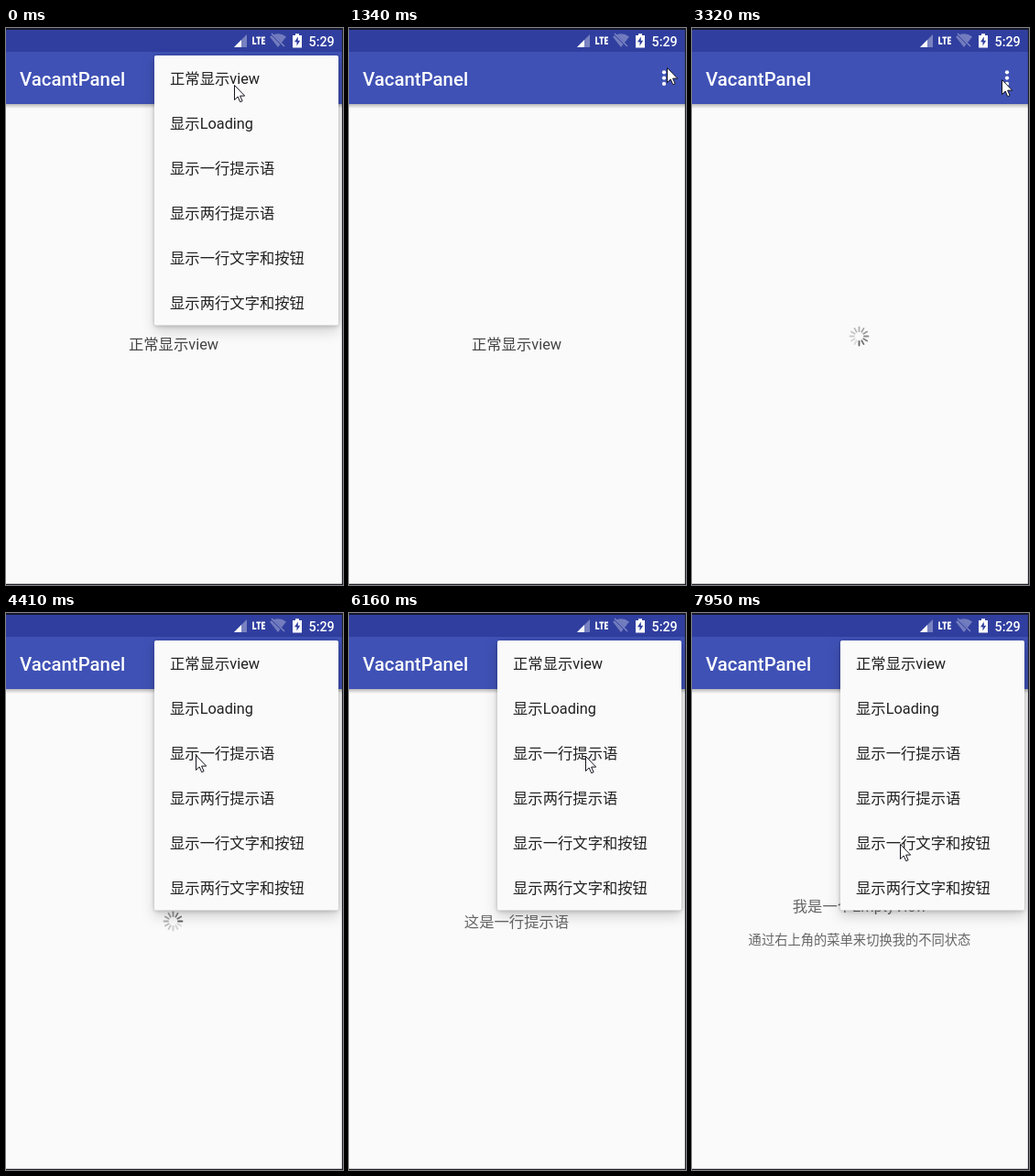
An HTML page for the animation above (8000 ms loop, 368x608 px).

```html
<!DOCTYPE html>
<html lang="zh-CN">
<head>
<meta charset="utf-8">
<title>View states</title>
<style>
  html, body { margin: 0; width: 100%; height: 100%; overflow: hidden; background: #fafafa; }
  svg { display: block; width: 368px; height: 608px; }
  text { font: 16.33px Roboto, "Noto Sans CJK SC", "Noto Sans CJK", sans-serif; }
  .medium { font-weight: 500; fill: #fff; }
  .state { text-anchor: middle; fill: #666; }
  #menu { filter: drop-shadow(0 1px 2px rgba(0,0,0,.22)) drop-shadow(0 6px 7px rgba(0,0,0,.17)); }
  #menu text { fill: #212121; }
</style>
</head>
<body>
<svg viewBox="0 0 368 608">
  <defs>
    <linearGradient id="barShadow" x2="0" y2="1">
      <stop stop-color="#000" stop-opacity=".26"/>
      <stop offset="1" stop-color="#000" stop-opacity="0"/>
    </linearGradient>
    <clipPath id="rowClip"><rect id="rowShape" x="162" width="201" height="49"/></clipPath>
    <clipPath id="reveal"><rect id="revealShape"/></clipPath>
  </defs>

  <rect width="368" height="608" fill="#fafafa"/>
  <g class="state"><text x="183" y="351" fill="#444">正常显示view</text></g>
  <g class="state" id="spinner" transform="translate(182.5 336.5)"></g>
  <g class="state"><text x="183" y="343">这是一行提示语</text></g>
  <g class="state">
    <text x="183" y="325.5">我是一个EmptyView</text>
    <text x="183" y="361.5" style="font-size:14.29px">通过右上角的菜单来切换我的不同状态</text>
  </g>

  <rect y="83" width="368" height="5" fill="url(#barShadow)"/>
  <rect y="26" width="368" height="57" fill="#3f51b5"/>
  <rect width="368" height="26" fill="#303f9f"/>
  <text class="medium" x="15" y="62.5" style="font-size:20.4px">VacantPanel</text>
  <g fill="#fff">
    <circle cx="344" cy="48.3" r="2.1"/>
    <circle cx="344" cy="54.6" r="2.1"/>
    <circle cx="344" cy="60.9" r="2.1"/>
  </g>

  <!-- status icons -->
  <path d="M263 7V21H249Z" fill="#fff" opacity=".35"/>
  <path d="M257 13V21H249Z" fill="#fff"/>
  <path d="M270 9.5V17.2H273.4M273.3 10.3H278.3M275.8 10.3V18M283 10.3H279.9V17.2H283M280 13.7H282.6" fill="none" stroke="#fff" stroke-width="1.7"/>
  <path d="M288 9.5Q297 3 306 9.5L297 21Z" fill="#fff" opacity=".32"/>
  <path d="M289 5.5L304 20.5" stroke="#303f9f" stroke-width="2.4"/>
  <path d="M290 6L304 20" stroke="#fff" stroke-width="1.2" opacity=".4"/>
  <path d="M313 8H316V6.3H320V8H323V21.5H313Z" fill="#fff"/>
  <path d="M318.8 9.5L315 15.3H317.5V19.5L321.2 13.7H318.8Z" fill="#303f9f"/>
  <text class="medium" x="330.5" y="19.6" style="font-size:14.3px">5:29</text>

  <g id="menu">
    <g clip-path="url(#reveal)">
      <rect x="162" y="30" width="201" height="294.5" rx="2" fill="#fafafa"/>
      <g id="press" clip-path="url(#rowClip)">
        <rect id="row" x="162" width="201" height="49" fill="#000" opacity=".04"/>
        <circle id="ripple" fill="#000" opacity=".08"/>
      </g>
      <g id="items"></g>
    </g>
  </g>

  <path d="M0 1H368" stroke="#16182c" stroke-width="2"/>
  <path d="M367.5 0V608M0 607.3H368" stroke="#20202a" stroke-width="1.3"/>
  <path id="cursor" d="M.5 .5V16.5L4.2 13 6.7 18.7 9.1 17.7 6.6 12.1H11.7Z" fill="#fff" stroke="#15151f"/>
</svg>

<script>
const $ = id => document.getElementById(id);
const NS = "http://www.w3.org/2000/svg";
const LOOP = 8000;
const clamp = v => Math.max(0, Math.min(1, v));
const smooth = p => p * p * (3 - 2 * p);
const set = (node, attrs) => {
  for (const key in attrs) node.setAttribute(key, attrs[key]);
  return node;
};
const add = (parent, tag, attrs) => parent.appendChild(set(document.createElementNS(NS, tag), attrs));

const bursts = [
  [150, 1100, 7], [1220, 1340, 2], [1640, 2150, 5], [2450, 3440, 9], [3590, 4560, 8],
  [4680, 5650, 8], [5770, 6700, 8], [6850, 6970, 2], [7250, 7950, 6]
];
const ticks = [0, ...bursts.flatMap(([from, to, count]) =>
  Array.from({ length: count }, (_, i) => Math.round(from + (to - from) * i / (count - 1))))];

// Each visit to the menu: opening time, pick time, picked item
const visits = [
  { open: -900, pick: 150, item: 0 },
  { open: 1640, pick: 2450, item: 1 },
  { open: 3720, pick: 4680, item: 2 },
  { open: 5770, pick: 6300, item: 3 },
  { open: 7250, pick: 9000, item: 4 }
];

// Pointer path: time, x, y
const path = [
  [0, 249, 62], [300, 249, 62], [1100, 347, 36], [1220, 347, 34], [1340, 347, 43],
  [1640, 347, 43], [2150, 230, 107], [2700, 230, 107], [3440, 347, 52], [3720, 347, 52],
  [4300, 207, 155], [4900, 207, 155], [5520, 343, 80], [5650, 347, 55], [5770, 347, 55],
  [6200, 215, 204], [6400, 215, 204], [6850, 347, 57], [7250, 347, 57],
  [7900, 227, 252], [8000, 227, 252]
];

const labels = ["正常显示view", "显示Loading", "显示一行提示语", "显示两行提示语", "显示一行文字和按钮", "显示两行文字和按钮"];
labels.forEach((label, i) => {
  add($("items"), "text", { x: 179, y: 61 + 49 * i }).textContent = label;
});

const states = [...document.querySelectorAll(".state")];
const spokes = Array.from({ length: 12 }, (_, i) => add($("spinner"), "path", {
  d: "M0 -5.5V-10", stroke: "#555", "stroke-width": 1.8, "stroke-linecap": "round", transform: `rotate(${i * 30})`
}));

function pointerAt(t) {
  const next = path.findIndex(point => point[0] > t);
  const [t0, x0, y0] = path[next - 1];
  const [t1, x1, y1] = path[next];
  const p = smooth((t - t0) / (t1 - t0));
  return [x0 + (x1 - x0) * p, y0 + (y1 - y0) * p];
}

function drawMenu(t, visit) {
  const shown = clamp((t - visit.open + 100) / 350);
  const held = t - visit.pick;
  const grow = 1 - (1 - shown) ** 3;
  const width = 201 * (.7 + .3 * grow), height = 295 * (.4 + .6 * grow);
  set($("menu"), { opacity: t < visit.open ? 0 : shown * (1 - clamp((held - 150) / 350)) });
  set($("revealShape"), { x: 363 - width, y: 30, width, height });

  const top = 79 + 49 * (visit.item - 1);
  const [x, y] = pointerAt(visit.pick % LOOP);
  set($("press"), { opacity: held < 0 ? 0 : 1 - clamp((held - 200) / 300) });
  set($("rowShape"), { y: top });
  set($("row"), { y: top });
  set($("ripple"), { cx: x, cy: y - 3, r: 20 + Math.max(0, held) * .3 });
}

function draw(t) {
  const visit = visits.findLast(v => v.open <= t);
  const state = visits.findLast(v => v.pick <= t)?.item ?? 0;
  states.forEach((node, i) => set(node, { visibility: i === state ? "visible" : "hidden" }));

  const head = Math.floor(t / 100) - 15;
  spokes.forEach((spoke, i) => {
    const age = ((head - i) % 12 + 12) % 12;
    set(spoke, { opacity: .18 + .72 * (1 - age / 12) ** 1.5 });
  });

  drawMenu(t, visit);
  set($("cursor"), { transform: `translate(${pointerAt(t).map(Math.round)})` });
}

const start = performance.now();
function frame() {
  const t = (performance.now() - start) % LOOP;
  draw(ticks.findLast(tick => tick <= t));
  requestAnimationFrame(frame);
}
frame();
</script>
</body>
</html>
```
